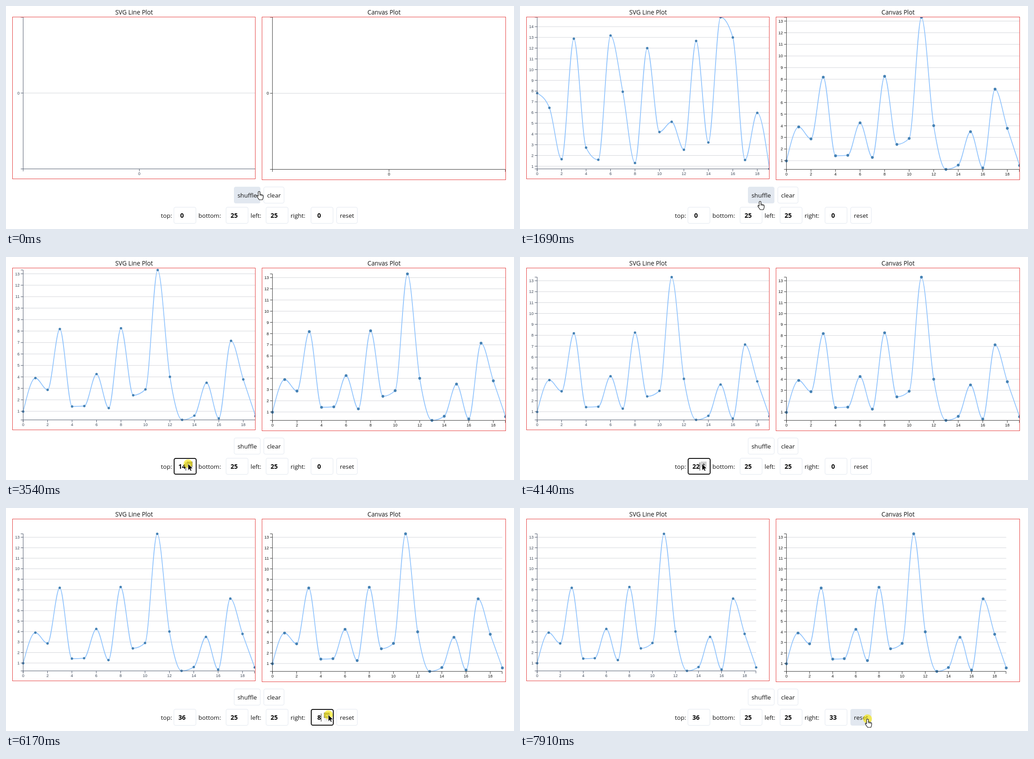
Recreate the animation shown at these times as an HTML page. Size 1130 by 496 pixels, loop 8000 ms.

```html
<!DOCTYPE html>
<html lang="en">
<head>
<meta charset="utf-8">
<title>Line plots</title>
<style>
html, body { margin: 0; width: 100%; height: 100%; overflow: hidden; background: #fff; }
svg { display: block; width: 1130px; height: 496px; }
.ui { font: 13.5px "Open Sans", "Noto Sans", sans-serif; fill: #111; }
.num { font: bold 14px "Open Sans", "Noto Sans", sans-serif; fill: #000; text-anchor: middle; }
.tick { font: 9px "Liberation Sans", Arial, sans-serif; }
</style>
</head>
<body>
<svg id="stage" viewBox="0 0 1130 496">
  <defs>
    <clipPath id="clipSvg"><rect x="14" y="24" width="541" height="361"/></clipPath>
    <clipPath id="clipCanvas"><rect x="569" y="24" width="543" height="363"/></clipPath>
  </defs>
  <text class="ui" x="285" y="19" text-anchor="middle" style="font-size:13.65px">SVG Line Plot</text>
  <text class="ui" x="841" y="19" text-anchor="middle" style="font-size:13.65px">Canvas Plot</text>
  <g id="svgPlot" clip-path="url(#clipSvg)"></g>
  <g id="canvasPlot" clip-path="url(#clipCanvas)"></g>
  <g id="controls"></g>
  <g id="pointer"></g>
</svg>
<script>
const LOOP = 8000, SCALE = 0.9, COUNT = 20, TWEEN = 215, REPEAT = 50;
const byId = id => document.getElementById(id);
const lerp = (a, b, e) => a + (b - a) * e;
const clamp = v => Math.max(0, Math.min(1, v));
const cubic = u => u < 0.5 ? 4 * u ** 3 : 1 - 4 * (1 - u) ** 3;
const px = v => +v.toFixed(2);
const inside = (p, x, y, w, h) => p.x >= x && p.x <= x + w && p.y >= y && p.y <= y + h;

// data shown after each shuffle
const random = seed => () => (seed = seed * 16807 % 2147483647) / 2147483647;
const rnd = random(4711);
const shuffles = [
  { at: 260, data: Array.from({ length: COUNT }, () => 0.3 + 14 * rnd() ** 1.4) },
  { at: 990, data: [7.81, 6.44, 1.65, 12.88, 2.73, 1.6, 13.18, 7.94, 1.3, 12, 4.19, 5.14, 2.53, 12.67, 3.21, 14.88, 13, 1.58, 5.97, 0.75] },
  { at: 1690, data: [0.98, 3.9, 2.87, 8.18, 1.42, 1.46, 4.25, 1.28, 8.25, 2.4, 2.91, 13.33, 4.01, 0.25, 0.62, 3.49, 0.38, 7.15, 3.78, 0.58] }
];

// spinner arrows held down: one step at once, then repeating after a delay
const topHolds = [
  { start: 2670, from: 0, to: 22, delay: 250 },
  { start: 4300, from: 22, to: 36, delay: 200 }
];
const rightHolds = [{ start: 5610, from: 0, to: 33, delay: 240 }];
const stepsOf = holds => holds.flatMap(h => Array.from({ length: h.to - h.from }, (_, n) => ({
  at: h.start + (n ? h.delay + REPEAT * (n - 1) : 0), value: h.from + n + 1
})));
const topSteps = stepsOf(topHolds), rightSteps = stepsOf(rightHolds);
const valueAt = (steps, t) => steps.reduce((v, s) => s.at <= t ? s.value : v, 0);

// every step restarts the tween from wherever it has got to
function easedAt(steps, t) {
  let value = 0;
  steps.forEach((s, i) => {
    if (s.at > t) return;
    const end = Math.min(t, i + 1 < steps.length ? steps[i + 1].at : t);
    value = lerp(value, s.value, cubic(clamp((end - s.at) / TWEEN)));
  });
  return value;
}

const presses = [[160, 260], [890, 990], [1590, 1690], [2670, 3930], [4300, 5110], [5610, 7410], [7860, 8000]];
const route = [
  [0, 563, 412], [1240, 563, 412], [1380, 530, 453], [1440, 530, 453], [1560, 534, 434], [1740, 534, 434],
  [2540, 405, 460], [5130, 405, 460], [5340, 717, 460], [7430, 717, 460], [7640, 773, 469], [LOOP, 773, 469]
];
function pointerAt(t) {
  const i = Math.max(1, route.findIndex(r => r[0] > t));
  const [t0, x0, y0] = route[i - 1], [t1, x1, y1] = route[i];
  const u = clamp((t - t0) / (t1 - t0)), e = u * u * (3 - 2 * u);
  return { x: lerp(x0, x1, e), y: lerp(y0, y1, e) };
}

const plots = {
  svg: { left: 38.2, right: 555, bottom: 362.3, frame: [14.5, 24.5, 540, 360], ink: '#4a5568', label: '#3c4656', dot: 2.7 },
  canvas: { left: 592.7, right: 1111.3, bottom: 363.4, frame: [569.5, 24.5, 542, 362], ink: '#333', label: '#111', dot: 3.1 }
};

const line = (x1, y1, x2, y2, stroke, opacity = 1) =>
  `<path d="M${px(x1)} ${px(y1)}L${px(x2)} ${px(y2)}" stroke="${stroke}" opacity="${px(opacity)}"/>`;
const box = (x, y, w, h, r, fill, stroke, width = 1) =>
  `<rect x="${x}" y="${y}" width="${w}" height="${h}" rx="${r}" fill="${fill}" stroke="${stroke}" stroke-width="${width}"/>`;
const text = (cls, x, y, s, extra = '') => `<text class="${cls}" x="${px(x)}" y="${px(y)}" ${extra}>${s}</text>`;

function monotonePath(pts) {
  const n = pts.length, dx = pts[1][0] - pts[0][0];
  const slope = pts.slice(1).map((p, i) => (p[1] - pts[i][1]) / dx);
  const m = pts.map((_, i) => {
    if (!i || i === n - 1) return 0;
    const a = slope[i - 1], b = slope[i];
    return (Math.sign(a) + Math.sign(b)) * Math.min(Math.abs(a), Math.abs(b), Math.abs(a + b) / 4) || 0;
  });
  m[0] = (3 * slope[0] - m[1]) / 2;
  m[n - 1] = (3 * slope[n - 2] - m[n - 2]) / 2;
  return pts.reduce((d, [x, y], i) => {
    if (!i) return `M${px(x)} ${px(y)}`;
    const [x0, y0] = pts[i - 1], h = dx / 3;
    return d + `C${px(x0 + h)} ${px(y0 + m[i - 1] * h)} ${px(x - h)} ${px(y - m[i] * h)} ${px(x)} ${px(y)}`;
  }, '');
}

function scaleFor(data, y0, y1) {
  const lo = Math.min(...data), hi = Math.max(...data);
  return { y: v => y1 - (v - lo) / (hi - lo) * (y1 - y0), has: v => v >= lo && v <= hi };
}

function drawPlot(plot, from, to, e, top, right) {
  const { left, bottom, ink, label } = plot;
  const y0 = 25 + top * SCALE, x1 = plot.right - right * SCALE;
  const xAt = i => left + (x1 - left) * i / (COUNT - 1);
  let grid = '', axis = '', marks = '';
  const yTick = (y, v, o) => {
    grid += line(left, y, x1, y, '#d3d5da', o);
    axis += line(left - 5.4, y, left, y, ink, o) + text('tick', left - 8, y + 3.2, v, `text-anchor="end" fill="${label}" opacity="${px(o)}"`);
  };
  const xTick = (x, v) => {
    axis += line(x, bottom, x, bottom + 5.4, ink) + text('tick', x, bottom + 13.8, v, `text-anchor="middle" fill="${label}"`);
  };
  if (!to) {
    yTick((y0 + bottom) / 2, 0, 1);
    xTick((left + x1) / 2, 0);
  } else {
    const b = scaleFor(to, y0, bottom), a = from ? scaleFor(from, y0, bottom) : b;
    for (let v = 0; v <= 15; v++) {
      const o = lerp(from && a.has(v) ? 1 : 0, b.has(v) ? 1 : 0, e);
      if (o > 0) yTick(lerp(a.y(v), b.y(v), e), v, o);
    }
    for (let i = 0; i < COUNT; i += 2) xTick(xAt(i), i);
    const pts = to.map((v, i) => [xAt(i), lerp(a.y(from ? from[i] : v), b.y(v), e)]);
    marks = `<g opacity="${from ? 1 : px(e)}"><path d="${monotonePath(pts)}" fill="none" stroke="#93c5fd" stroke-width="1.8"/>` +
      pts.map(([x, y]) => `<circle cx="${px(x)}" cy="${px(y)}" r="${plot.dot}" fill="#4682b4"/>`).join('') + '</g>';
  }
  axis += `<path d="M${left - 5.4} ${px(y0)}H${left}V${bottom}H${left - 5.4}M${left} ${bottom + 5.4}V${bottom}H${px(x1 - 0.5)}v5.4" fill="none" stroke="${ink}"/>`;
  return grid + marks + axis + box(...plot.frame, 0, 'none', '#e53e3e');
}

function button(x, y, w, label, p) {
  const hover = inside(p, x, y, w, 37);
  return box(x + 0.5, y + 0.5, w - 1, 36, 3.5, hover ? '#e2e8f0' : '#fff', '#e2e8f0') +
    text('ui', x + w / 2, y + 24, label, 'text-anchor="middle"');
}

function field(x, label, labelX, value, focused, p, pressed) {
  let out = text('ui', labelX, 471, label);
  out += focused ? box(x + 1, 448, 49, 35, 3.5, '#fff', '#111', 2) : box(x + 0.5, 447.5, 49, 36, 3.5, '#fff', '#e2e8f0');
  out += text('num', x + 18.5, 471, value);
  if (focused) {
    const caret = x + 18.5 + String(value).length * 4 + 0.5;
    out += line(caret, 457, caret, 475, '#111');
  }
  if (focused || inside(p, x, 447, 50, 37)) {
    const over = inside(p, x + 28, 455, 15, 12);
    out += box(x + 29, 455, 13, 21, 0, '#f4f4f4', 'none');
    if (over) out += box(x + 29, 455, 13, 12, 0, pressed ? '#8a8a8a' : '#cfcfcf', 'none');
    out += `<path d="M${x + 32} 463l3.5-4 3.5 4zM${x + 32} 469l3.5 4 3.5-4z" fill="${over && pressed ? '#ddd' : '#505050'}"/>`;
  }
  return out;
}

const HAND = 'M-2 1.6Q0-1 2 1.6V6.6L7.4 8Q9.4 8.6 9.4 11Q9.4 15 7.5 19H.3L-4.3 12.4Q-5.4 10.2-4 9.6Q-3 9.4-2 11Z';
const ARROW = 'M0 0V14.5L3.4 11.4L5.6 16.2L8 15.1L5.8 10.5H10.5Z';

function render(t) {
  const p = pointerAt(t), pressed = presses.some(([a, b]) => t >= a && t < b);
  const index = shuffles.reduce((k, s, i) => s.at <= t ? i : k, -1);
  const now = shuffles[index], before = shuffles[index - 1];
  const data = now && now.data, old = before && before.data;
  const e = now ? cubic(clamp((t - now.at) / TWEEN)) : 1;
  const top = valueAt(topSteps, t), right = valueAt(rightSteps, t);

  byId('svgPlot').innerHTML = drawPlot(plots.svg, old, data, e, easedAt(topSteps, t), easedAt(rightSteps, t));
  byId('canvasPlot').innerHTML = drawPlot(plots.canvas, data, data, 1, top, right);

  byId('controls').innerHTML =
    button(507, 402, 59, 'shuffle', p) + button(573, 402, 46, 'clear', p) +
    field(373, 'top:', 344.5, top, t >= 2670 && t < 5610, p, pressed) +
    field(489, 'bottom:', 428, 25, false, p, pressed) +
    field(578, 'left:', 544, 25, false, p, pressed) +
    field(678, 'right:', 633, right, t >= 5610 && t < 7860, p, pressed) +
    button(735, 447, 47, 'reset', p);

  const onButton = inside(p, 507, 402, 59, 37) || inside(p, 573, 402, 46, 37) || inside(p, 735, 447, 47, 37);
  byId('pointer').innerHTML = `<g transform="translate(${px(p.x)} ${px(p.y)})">` +
    (pressed ? '<circle r="10" fill="#f7e600" opacity=".62"/>' : '') +
    (onButton ? `<path d="${HAND}" fill="#fff" stroke="#111" stroke-width="1.2" stroke-linejoin="round"/><path d="M2 6v4M4.6 8v2.5M7 8.6v2.4" stroke="#111"/>`
      : `<path d="${ARROW}" fill="#000" stroke="#fff" stroke-width=".8"/>`) + '</g>';
}

const began = performance.now();
function tick() {
  render((performance.now() - began) % LOOP);
  requestAnimationFrame(tick);
}
tick();
</script>
</body>
</html>
```
